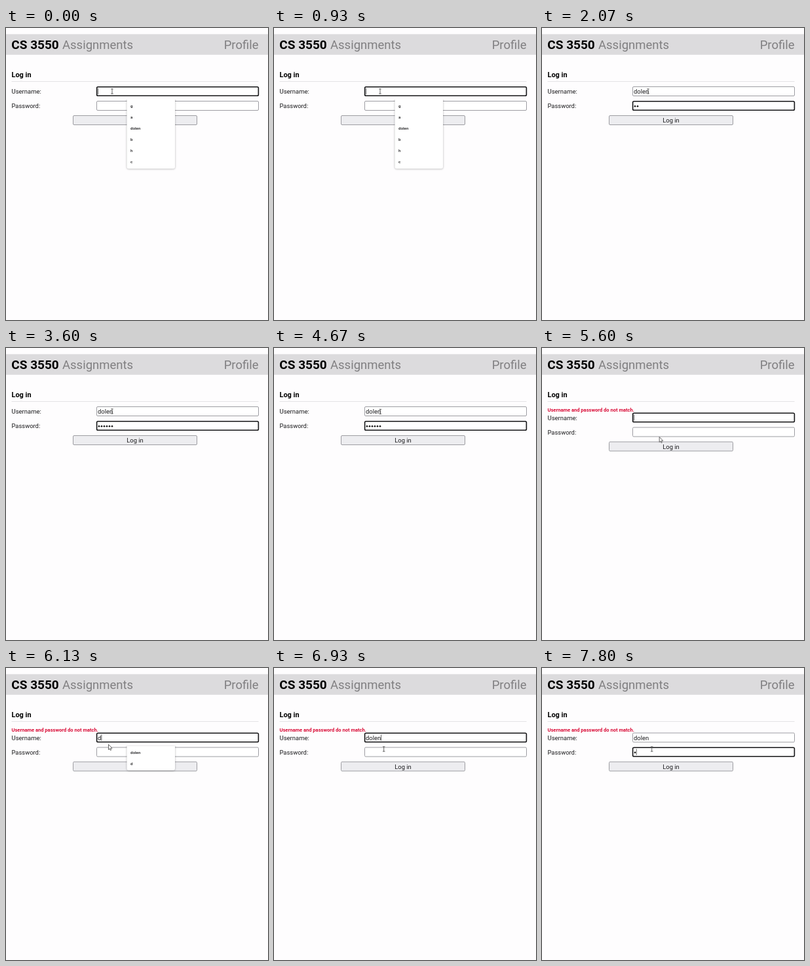
These frames come from a looping animation (400x445 px, 8000 ms). An HTML page with a canvas:

```html
<!DOCTYPE html>
<html lang="en">
<head>
<meta charset="utf-8">
<title>Log in</title>
<style>
html, body { margin: 0; width: 100%; height: 100%; overflow: hidden; background: #fefdfe; }
canvas { display: block; width: 400px; height: 445px; }
</style>
</head>
<body>
<canvas id="stage"></canvas>
<script>
const W = 400, H = 445, LOOP = 8000, TICK = 200 / 3;
const FONT = 'Roboto, "Open Sans", sans-serif';
const NAME = 'dolen';
const SHIFT = 9.5;          // rows move down when the error shows
const ERROR_AT = 5000;

// Key presses: [first-form name], [first password], [second name], [second password]
const keys = {
  name1: [1000, 1130, 1270, 1400, 1530],
  pass1: [1870, 2070, 2870, 3400, 3470, 3600],
  name2: [5800, 6400, 6600, 6730, 6870],
  pass2: [7800]
};
const TAB1 = 1670, TAB2 = 7400;

// Pointer path: time, x, y
const path = [
  [0, 162, 96.5], [4650, 162, 96.5], [4930, 191, 145.5], [5470, 191, 145.5],
  [5800, 156.5, 116.5], [6200, 156.5, 116.5], [6530, 167.7, 123.5], [LOOP, 167.7, 123.5]
];

const canvas = document.getElementById('stage');
const ctx = canvas.getContext('2d');
const dpr = window.devicePixelRatio || 1;
canvas.width = W * dpr;
canvas.height = H * dpr;

const count = (list, t) => list.filter(k => k <= t).length;

function text(str, x, y, size, color = '#1b1b1d', weight = 400, align = 'left') {
  ctx.font = `${weight} ${size}px ${FONT}`;
  ctx.fillStyle = color;
  ctx.textAlign = align;
  ctx.fillText(str, x, y);
  return ctx.measureText(str).width;
}

function box(x, y, w, h, r, fill, stroke, line = 1) {
  ctx.beginPath();
  ctx.roundRect(x, y, w, h, r);
  ctx.fillStyle = fill;
  ctx.fill();
  if (!stroke) return;
  ctx.strokeStyle = stroke;
  ctx.lineWidth = line;
  ctx.stroke();
}

function field(y, focused) {
  if (focused) box(138.6, y + 0.3, 246.8, 13.4, 1.8, '#fff', '#151517', 1.6);
  else box(138.5, y, 247, 14, 1.5, '#fff', '#9d9da2');
}

function caret(x, y) {
  ctx.fillStyle = '#444';
  ctx.fillRect(x, y + 2.3, 0.8, 9.5);
}

function dots(n, y) {
  ctx.fillStyle = '#111';
  for (let i = 0; i < n; i++) {
    ctx.beginPath();
    ctx.arc(142 + i * 4, y + 7.7, 1.3, 0, 7);
    ctx.fill();
  }
}

function menu(top, items) {
  const h = items.length * 17 + 3.5;
  ctx.save();
  ctx.beginPath();
  ctx.rect(180, top, 84, h + 8);
  ctx.clip();
  ctx.shadowColor = 'rgba(0,0,0,0.32)';
  ctx.shadowBlur = 3 * dpr;
  ctx.shadowOffsetY = 0.6 * dpr;
  box(184.5, top - 4, 73.5, h + 4, 3, '#fff');
  ctx.restore();
  items.forEach((s, i) => text(s, 190, top + 12.2 + i * 17, 6.2, '#1b1b1d', 500));
}

function iBeam(x, y) {
  ctx.strokeStyle = '#555';
  ctx.lineWidth = 0.9;
  ctx.beginPath();
  ctx.moveTo(x - 1.8, y - 3.6);
  ctx.lineTo(x + 1.8, y - 3.6);
  ctx.moveTo(x, y - 3.6);
  ctx.lineTo(x, y + 3.6);
  ctx.moveTo(x - 1.8, y + 3.6);
  ctx.lineTo(x + 1.8, y + 3.6);
  ctx.stroke();
}

function arrow(x, y) {
  const pts = [[0, 0], [0, 8], [1.8, 6.4], [3, 9], [4.2, 8.4], [3.1, 5.9], [5.5, 5.7]];
  ctx.beginPath();
  pts.forEach(([px, py]) => ctx.lineTo(x + px, y + py));
  ctx.closePath();
  ctx.fillStyle = '#fff';
  ctx.fill();
  ctx.strokeStyle = '#555';
  ctx.lineWidth = 0.9;
  ctx.stroke();
}

function pointer(t) {
  const q = Math.floor((t + 4) / TICK) * TICK;
  const i = path.findIndex(p => p[0] > q);
  const [t0, x0, y0] = path[i - 1], [t1, x1, y1] = path[i];
  const u = (q - t0) / (t1 - t0), e = u * u * (3 - 2 * u);
  return [x0 + (x1 - x0) * e, y0 + (y1 - y0) * e];
}

function suggestions(n, second) {
  if (n === NAME.length) return [];
  if (n > 1) return [NAME];
  if (n === 1) return [NAME, 'd'];
  return second ? [] : ['g', 'a', NAME, 'b', 'h', 'c'];
}

function header() {
  ctx.fillStyle = '#fefdfe';
  ctx.fillRect(0, 0, W, H);
  ctx.fillStyle = '#dcdbdd';
  ctx.fillRect(0, 9.4, W, 31.4);
  text('CS 3550', 8.3, 32.3, 19, '#000', 600);
  text('Assignments', 86, 32.3, 18.5, '#807f81');
  text('Profile', 385.5, 32.3, 18.5, '#807f81', 400, 'right');
  text('Log in', 8.5, 74.7, 10.9, '#000', 600);
  ctx.fillStyle = '#e4e3e5';
  ctx.fillRect(8.5, 81, 377, 1);
}

function draw(t) {
  const second = t >= ERROR_AT;
  const dy = second ? SHIFT : 0;
  const typed = count(second ? keys.name2 : keys.name1, t);
  const hidden = count(second ? keys.pass2 : keys.pass1, t);
  const inPass = t >= (second ? TAB2 : TAB1);
  const userY = 89.5 + dy, passY = 111.5 + dy, btnY = 133.5 + dy;
  const [mx, my] = pointer(t);
  const over = y => my >= y && my <= y + 14;

  header();
  if (second) text('Username and password do not match.', 8.5, 97.2, 7.55, '#d90b36', 700);
  text('Username:', 8.5, 100 + dy, 9.5);
  text('Password:', 8.5, 122 + dy, 9.4);

  field(userY, !inPass);
  field(passY, inPass);
  box(102.5, btnY, 189, 14, 1.5, over(btnY) ? '#e2e2e5' : '#ededf0', '#9d9da2');
  text('Log in', 197, btnY + 10.6, 9.4, '#1b1b1d', 400, 'center');

  const w = text(NAME.slice(0, typed), 140, userY + 10.6, 9.4);
  dots(hidden, passY);
  if (!inPass) {
    caret(140.2 + w, userY);
    const items = suggestions(typed, second);
    if (items.length) menu(userY + 19.5, items);
  } else if (second) {
    caret(hidden ? 143.8 : 140.2, passY);
  }

  if (over(userY) || over(passY)) iBeam(mx, my);
  else arrow(mx, my);
}

function frame(now) {
  ctx.setTransform(dpr, 0, 0, dpr, 0, 0);
  draw(now % LOOP);
  requestAnimationFrame(frame);
}
requestAnimationFrame(frame);
</script>
</body>
</html>
```
